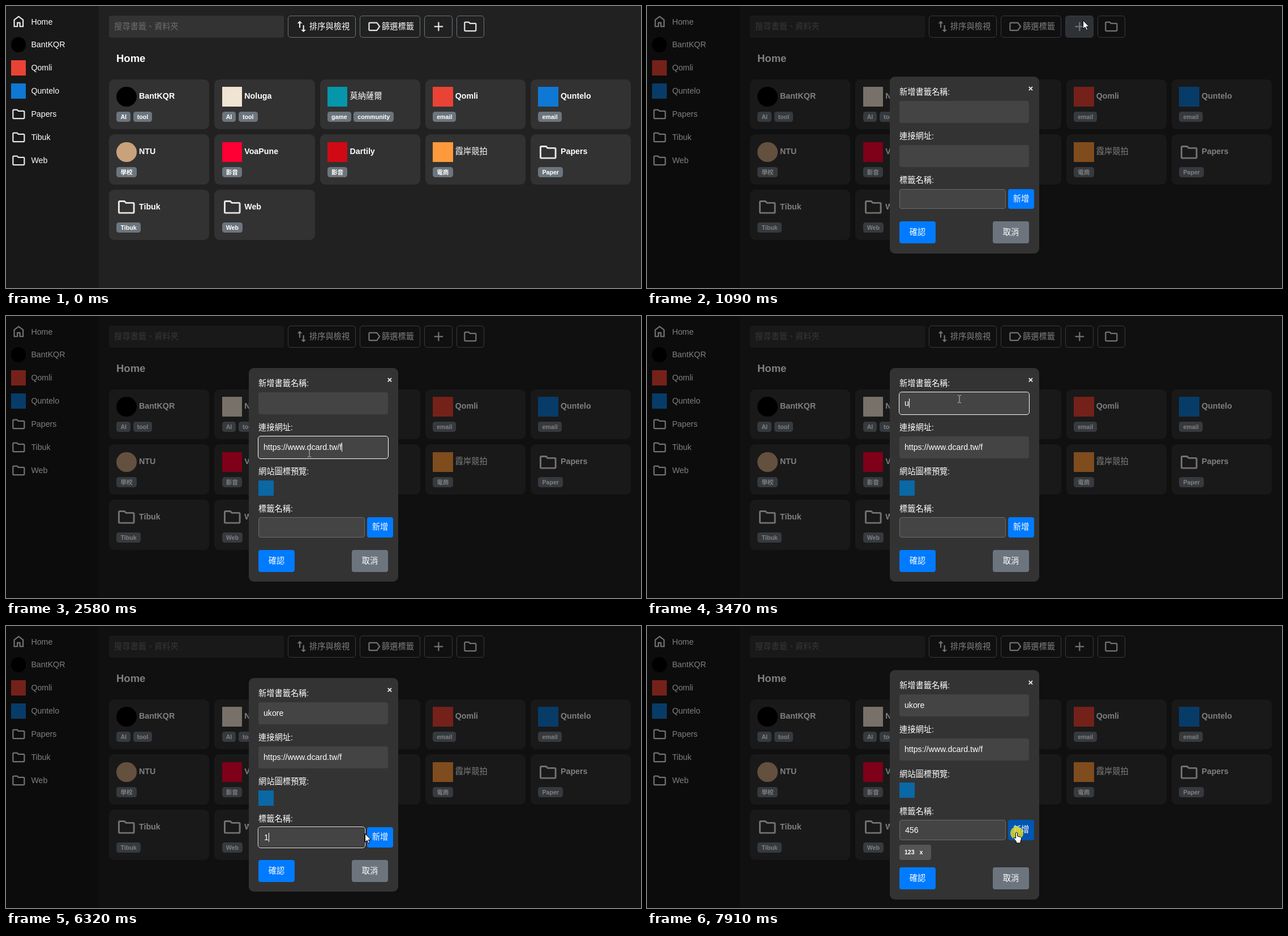
Recreate the animation shown at these times as an HTML page. Size 1122 by 499 pixels, loop 8000 ms.

```html
<!DOCTYPE html>
<html lang="zh-TW">
<head>
<meta charset="utf-8">
<style>
html, body { margin: 0; width: 100%; height: 100%; overflow: hidden; background: #212121; }
body { position: relative; color: #fff; font: 14.22px/20px "Liberation Sans", "Noto Sans CJK TC", "Noto Sans CJK", sans-serif; }
div, span, svg { position: absolute; box-sizing: border-box; white-space: pre; }
svg { fill: #e6e6e6; overflow: visible; }
b { font-weight: 700; }
.side { left: 0; top: 0; width: 164px; height: 100%; background: #181818; }
.card { width: 177.3px; height: 88.8px; border-radius: 9px; background: #323232; }
.tags { left: 13.3px; top: 57.6px; display: flex; gap: 4.4px; }
.tags b { font-size: 10.67px; line-height: 18px; padding: 0 7.1px; border-radius: 4.5px; background: #6c757d; }
.tool { top: 17px; height: 39px; border: 1px solid #6c757d; border-radius: 5px; }
.shade { inset: 0; background: rgba(0,0,0,.5); }
.modal { left: 428.5px; width: 264px; border-radius: 9px; background: #333; }
.field { left: 17.5px; width: 229px; height: 39px; line-height: 39px; padding-left: 8.9px; border-radius: 4px; background: #444; }
.tagField { width: 187.5px; height: 35.5px; line-height: 34px; border: 1px solid #6b6b6b; }
.on { outline: 1.5px solid #fff; outline-offset: .5px; box-shadow: 0 0 0 1px #151515; border-color: #151515; }
.on i { display: inline-block; width: 1px; height: 16px; background: #fff; vertical-align: -3px; }
.btn { height: 39px; line-height: 39px; text-align: center; border-radius: 4px; background: #007bff; }
.chip { left: 17.5px; top: 309px; width: 56px; height: 26.5px; border-radius: 4px; background: #555; font: bold 10.67px/26.5px "Liberation Sans", sans-serif; padding-left: 8.9px; }
.click { width: 23px; height: 23px; margin: -11.5px; border-radius: 50%; background: rgba(238,225,25,.78); }
</style>
</head>
<body>
<script>
const paths = {
  home: 'M6 19h3v-6h6v6h3v-9l-6-4.5L6 10v9zm-2 2V9l8-6 8 6v12h-7v-6h-2v6H4z',
  folder: 'M9.17 6l2 2H20v10H4V6h5.17M10 4H4c-1.1 0-2 .9-2 2v12c0 1.1.9 2 2 2h16c1.1 0 2-.9 2-2V8c0-1.1-.9-2-2-2h-8l-2-2z',
  sort: 'M16 17V10h-2v7h-3l4 4 4-4h-3zM9 3L5 7h3v7h2V7h3L9 3z',
  label: 'M17.63 5.84C17.27 5.33 16.67 5 16 5H5C3.9 5 3 5.9 3 7v10c0 1.1.9 2 2 2h11c.67 0 1.27-.33 1.63-.84L22 12l-4.37-6.16zM16 17H5V7h11l3.55 5L16 17z',
  plus: 'M19 13h-6v6h-2v-6H5v-2h6V5h2v6h6v2z'
};
const box = (cls, x, y, w, inner = '', more = '') =>
  `<div class="${cls}" style="left:${x}px;top:${y}px;width:${w}px;${more}">${inner}</div>`;
const text = (x, cy, s, style = '') => `<span style="left:${x}px;top:${cy - 10}px;${style}">${s}</span>`;

// An icon is a path name, or a colour with an optional leading "o" for a round one.
function icon(kind, cx, cy, size) {
  const x = cx - size / 2, y = cy - size / 2;
  if (paths[kind]) return `<svg style="left:${x}px;top:${y}px" width="${size}" height="${size}" viewBox="0 0 24 24"><path fill-rule="evenodd" d="${paths[kind]}"/></svg>`;
  const round = kind[0] === 'o';
  return box('', x, y, size, '', `height:${size}px;background:${kind.slice(round)};border-radius:${round ? '50%' : 0}`);
}

const menu = [['Home', 'home'], ['BantKQR', 'o#000'], ['Qomli', '#ea4335'], ['Quntelo', '#0f78d4'],
  ['Papers', 'folder'], ['Tibuk', 'folder'], ['Web', 'folder']];
const cards = [
  ['BantKQR', 'o#000', 'AI', 'tool'], ['Noluga', '#f0e4d3', 'AI', 'tool'], ['莫納薩爾', '#0596ab', 'game', 'community'],
  ['Qomli', '#ea4335', 'email'], ['Quntelo', '#0f78d4', 'email'],
  ['NTU', 'o#c9a27c', '學校'], ['VoaPune', '#ff0033', '影音'], ['Dartily', '#d00a14', '影音'],
  ['霞岸競拍', '#ff9a3c', '電商'], ['Papers', 'folder', 'Paper'],
  ['Tibuk', 'folder', 'Tibuk'], ['Web', 'folder', 'Web']];

const menuY = i => 27.6 + i * 40.89;
const page = '<div class="side"></div>' +
  menu.map(([name, kind], i) => icon(kind, 22, menuY(i), 26.7) + text(44.4, menuY(i), name)).join('') +
  box('', 182, 17, 308.5, '', 'height:39px;border-radius:4px;background:#333') + text(191, 36, '搜尋書籤、資料夾', 'color:#6e6e6e') +
  box('tool', 497.5, 17, 120.5) + icon('sort', 522.5, 36.3, 26.7) + text(536, 36, '排序與檢視') +
  box('tool', 625, 17, 107) + icon('label', 650, 36.3, 26.7) + text(664, 36, '篩選標籤') +
  '<div class="tool" id="add" style="left:739px;width:49.5px"></div>' + icon('plus', 764, 36.3, 26.7) +
  box('tool', 796, 17, 49) + icon('folder', 820.5, 36.3, 26.7) +
  text(195, 93, 'Home', 'font-size:18.5px;font-weight:700') +
  cards.map(([name, kind, ...tags], i) => box('card', 182 + i % 5 * 186.25, 129.5 + (i / 5 | 0) * 97.8, 177.3,
    icon(kind, 31, 31, 35.5) + text(53, 29.7, name, `font-weight:${name > '一' ? 500 : 700}`) +
    `<div class="tags">${tags.map(t => `<b>${t}</b>`).join('')}</div>`)).join('');

const modal = '<div id="popup"><div class="shade"></div><div class="modal" id="modal">' +
  text(245, 21.5, '×', 'font-size:15px;font-weight:700') +
  text(17.5, 27, '新增書籤名稱:') + '<div class="field" id="name" style="top:43px"></div>' +
  text(17.5, 105, '連接網址:') + '<div class="field" id="url" style="top:121px"></div>' +
  '<div id="preview">' + text(17.5, 183.5, '網站圖標預覽:') + icon('#0a68a5', 31, 212.5, 27) + '</div>' +
  '<div id="tagRow">' + text(17.5, 183.5, '標籤名稱:') + '<div class="field tagField" id="tag" style="top:199px"></div>' +
  '<div class="btn" id="addTag" style="left:209.5px;top:199px;width:46px;height:35.5px;line-height:35.5px">新增</div></div>' +
  '<div class="chip" id="chip">123<span style="left:35.5px">x</span></div>' +
  '<div id="actions">' + box('btn', 17.5, 256.7, 64, '確認') + box('btn', 182.5, 256.7, 64, '取消', 'background:#6c757d') + '</div></div></div>';

const pointers = '<div class="click" id="click"></div><svg id="pointer" style="left:0;top:0" width="1" height="1">' +
  '<path id="arrow" fill="#fff" stroke="#000" d="M.5 .5V15.5L4 12.2 6.4 17.6 8.7 16.6 6.4 11.4H11z"/>' +
  '<path id="beam" fill="none" stroke="#c4c4c4" d="M-3 -6.5H-1L0 -5.5 1 -6.5H3M0 -5.5V5.5M-3 6.5H-1L0 5.5 1 6.5H3"/>' +
  '<path id="hand" fill="#fff" stroke="#000" d="M-1.5 0Q0 -2 1.5 0V6L7.5 7.5Q9 8 8.5 11L7 15V18H-.5V15.5L-5 10Q-5 7.5 -3 8.5L-1.5 10Z"/></svg>';

document.body.innerHTML = page + modal + pointers;
const $ = id => document.getElementById(id);
$('popup').style.inset = 0;

// time, x, y of the pointer
const track = [[90, 1062, 478], [630, 770, 25], [1310, 770, 25], [1820, 531, 258], [2540, 531, 258], [2580, 536, 243],
  [3140, 552, 147], [4810, 552, 147], [4960, 561, 322], [5200, 558, 373], [5530, 558, 373], [6060, 632, 368],
  [6230, 632, 368], [6320, 634, 367], [6800, 653, 366], [7030, 653, 366], [7210, 470, 367], [7580, 470, 367], [7860, 653, 366]];
const clicks = [990, 2050, 3140, 5430, 6930, 7910];

function pointerAt(t) {
  const i = track.findIndex(k => k[0] > t);
  if (i < 0) return track[track.length - 1].slice(1);
  if (i === 0) return track[0].slice(1);
  const [a, b] = [track[i - 1], track[i]];
  const u = (t - a[0]) / (b[0] - a[0]), e = u * u * (3 - 2 * u);
  return [a[1] + (b[1] - a[1]) * e, a[2] + (b[2] - a[2]) * e];
}
const typed = (s, times, t) => s.slice(0, times.filter(k => t >= k).length);
const show = (id, yes) => $(id).style.display = yes ? '' : 'none';
const fade = (t, from) => Math.min(1, Math.max(0, (t - from) / 150));
const mix = (a, b, u) => `rgb(${a.map((v, i) => Math.round(v + (b[i] - v) * u))})`;

function setField(id, value, focused) {
  const html = value + (focused ? '<i></i>' : '');
  if ($(id).innerHTML !== html) $(id).innerHTML = html;
  $(id).classList.toggle('on', focused);
}

function draw(t) {
  const open = t >= 1090, preview = t >= 2540, chip = t >= 7030;
  const dy = preview ? 65.8 : 0, dy2 = dy + (chip ? 26.7 : 0), height = 313 + dy2, top = 281 - height / 2;
  show('popup', open);
  show('preview', preview);
  show('chip', chip);
  $('modal').style.top = top + 'px';
  $('modal').style.height = height + 'px';
  $('tagRow').style.top = dy + 'px';
  $('actions').style.top = dy2 + 'px';

  setField('name', typed('ukore', [3470, 3980, 4110, 4250, 4540], t), t >= 3140 && t < 5430);
  setField('url', preview ? 'https://www.dcard.tw/f' : '', t >= 2050 && t < 3140);
  setField('tag', chip ? typed('456', [7410, 7490, 7570], t) : typed('123', [6230, 6400, 6520], t),
    t >= 5430 && t < 6930 || t >= 7210 && t < 7910);

  $('add').style.background = `rgba(92,99,106,${t < 1150 ? fade(t, 480) : 0})`;
  const hover = t < 7060 ? fade(t, 6480) : t < 7500 ? 1 - fade(t, 7060) : fade(t, 7740);
  $('addTag').style.background = mix([0, 123, 255], [0, 86, 179], hover);

  const [x, y] = pointerAt(t);
  const inside = (l, r, a, b) => open && x > l && x < r && y > top + a && y < top + b;
  const hand = inside(638, 684, 199 + dy, 235 + dy);
  const beam = inside(446, 675, 43, 82) || inside(446, 675, 121, 160) || inside(446, 633.5, 199 + dy, 235 + dy);
  show('pointer', t >= 90);
  show('hand', hand);
  show('beam', beam);
  show('arrow', !hand && !beam);
  $('pointer').style.transform = `translate(${x}px,${y}px)`;
  $('click').style.left = x + 'px';
  $('click').style.top = y + 'px';
  show('click', clicks.some(c => t >= c && t < c + (c === 990 ? 60 : 100)));
}

function tick(now) {
  draw(now % 8000);
  requestAnimationFrame(tick);
}
draw(0);
requestAnimationFrame(tick);
</script>
</body>
</html>
```
